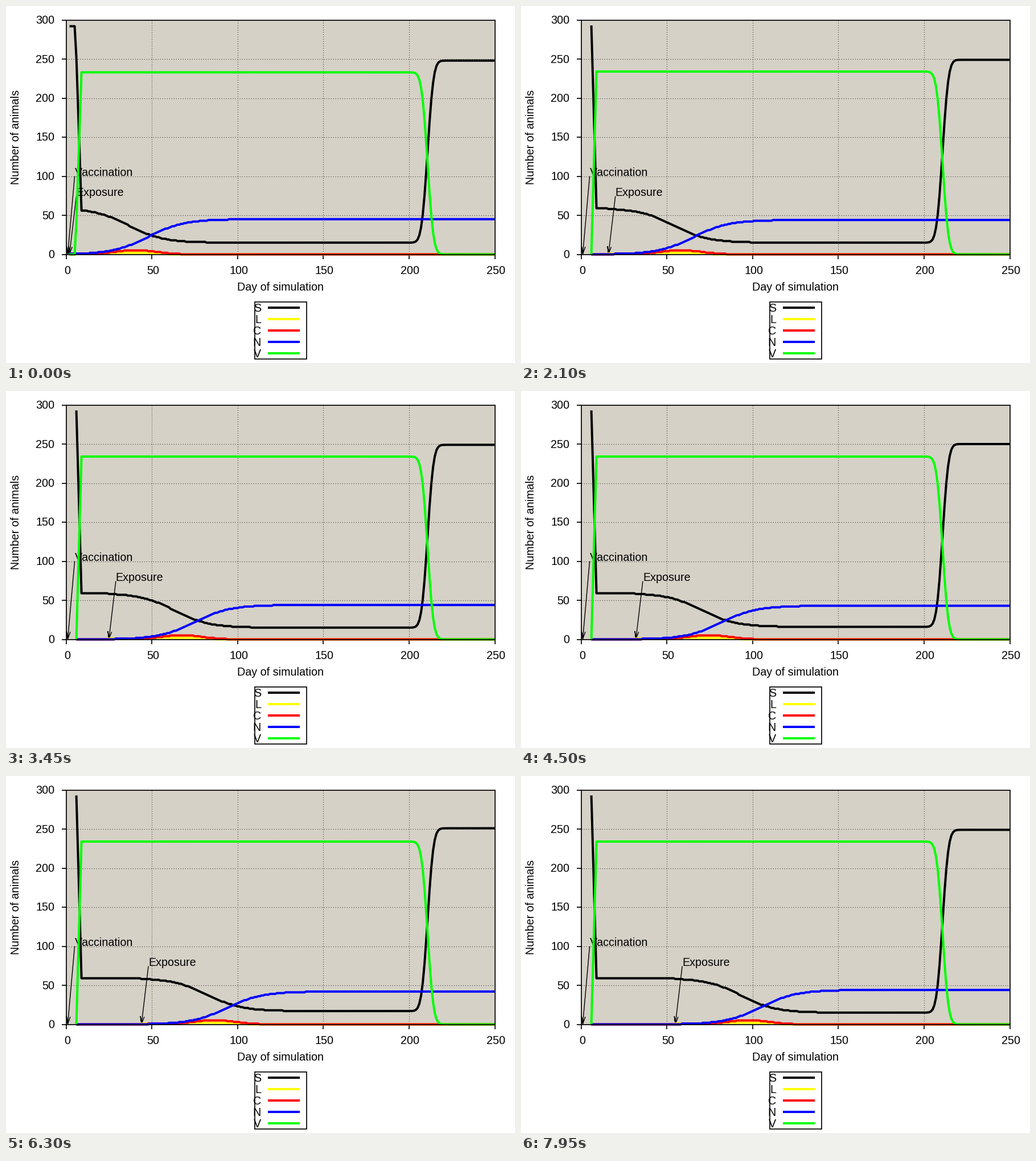
Write a matplotlib script that moves like this. It is 894 by 626 pixels and loops after 8 s.

```python
import math
import numpy as np
import matplotlib.pyplot as plt
from matplotlib.animation import FuncAnimation
from matplotlib.patches import Rectangle

W, H, DPI = 894, 626, 64
PX = 72 / DPI                      # points per pixel
LEFT, RIGHT, TOP, BOTTOM = 105.5, 858.5, 24.5, 435.5
STEP_MS, TICK_MS, LOOP_MS = 150, 50, 8000
HERD = 293
FONT = dict(family="Liberation Sans", size=19.8 * PX, color="black")
plt.rcParams["text.kerning_factor"] = 6

fig = plt.figure(figsize=(W / DPI, H / DPI), dpi=DPI, facecolor="white")
ax = fig.add_axes([0, 0, 1, 1])
ax.set(xlim=(0, W), ylim=(H, 0))
ax.axis("off")


def px_x(day):
    return LEFT + np.asarray(day) * (RIGHT - LEFT) / 250


def px_y(count):
    return BOTTOM - np.asarray(count) * (BOTTOM - TOP) / 300


def line(xs, ys, width, color="black", z=3, **kw):
    return ax.plot(xs, ys, lw=width * PX, color=color, zorder=z,
                   solid_capstyle="butt", solid_joinstyle="round", **kw)[0]


def label(x, y, text, ha="center", z=5, **kw):
    return ax.text(x, y, text, ha=ha, va=kw.pop("va", "baseline"), zorder=z, **FONT, **kw)


def box(x0, y0, x1, y1, z, face="none", edge="none"):
    ax.add_patch(Rectangle((x0, y0), x1 - x0, y1 - y0, fc=face, ec=edge,
                           lw=1.7 * PX, zorder=z))


# Plot area, grid, ticks and axis titles
box(LEFT, TOP, RIGHT, BOTTOM, 0, face="#d5d1c7")
box(LEFT, TOP, RIGHT, BOTTOM, 6, edge="black")
DOTS = dict(width=1, color="#55534f", z=1, dashes=(1.5, 2.5))
for day in range(0, 251, 50):
    x = px_x(day)
    line([x, x], [BOTTOM, BOTTOM + 8], 1.7)
    label(x + 2, 470, str(day))
    if 0 < day < 250:
        line([x, x], [TOP, BOTTOM], **DOTS)
for count in range(0, 301, 50):
    y = px_y(count)
    line([LEFT - 8, LEFT], [y, y], 1.7)
    label(85, y + 6.5, str(count), ha="right")
    if 0 < count < 300:
        line([LEFT, RIGHT], [y, y], **DOTS)
label(482, 499, "Day of simulation")
label(18, 230, "Number of animals", rotation=90, va="center")

# Legend
SERIES = dict(S="black", L="yellow", C="red", N="blue", V="lime")
box(436.5, 518.5, 527.5, 618.5, 3, face="white", edge="black")
for i, (name, color) in enumerate(SERIES.items()):
    y = 529 + 20 * i
    label(448, y + 6.5, name, ha="right")
    line([460, 516], [y, y], 4, color, z=5)

curves = {name: line([], [], 4, color, z=4 + i / 10)
          for i, (name, color) in enumerate(SERIES.items())}


class Marker:
    """Caption with an open-headed arrow to a day on the time axis."""

    def __init__(self, text, height):
        self.y = px_y(height)
        self.text = label(0, self.y, text, ha="left", z=2)
        self.arrow = line([], [], 1.4, z=2)

    def move(self, day):
        tip = complex(px_x(day), BOTTOM - 1)
        tail = complex(px_x(day + 4), self.y)
        back = 13 * (tail - tip) / abs(tail - tip)
        barbs = [tip + back * np.exp(1j * a) for a in np.radians([-15, 15])]
        path = np.array([tail, tip, barbs[0], tip, barbs[1]])
        self.arrow.set_data(path.real, path.imag)
        self.text.set_x(px_x(day + 4))


vaccination = Marker("Vaccination", 100)
exposure = Marker("Exposure", 74.5)
vaccination.move(1)

erf = np.vectorize(math.erf)


def normal_cdf(x, mean, sd):
    return (1 + erf((x - mean) / (sd * math.sqrt(2)))) / 2


def logistic(x, mid, rate):
    return 1 / (1 + np.exp(-rate * (x - mid)))


def outbreak(tau, u, onset, peak, mid, spread):
    """Case count: one animal from onset, then a bell-shaped wave."""
    wave = peak * np.exp(-((u - mid) / spread) ** 2 / 2)
    wave = np.where(u < mid, np.maximum(wave, 1), wave)
    return np.where(tau < onset, 0, np.round(wave))


def simulate(step):
    exposed = step + 2
    early = exposed < 6
    days = np.arange(min(exposed, 6), 251)
    tau = days - exposed
    u = tau - (52.3 - 3.8 * math.exp(-step / 5))   # days from the S/N crossing

    protected = HERD - 59 - early
    immune = round(np.interp(step, [0, 23, 42, 53], [45, 44, 42, 44]))
    rest = max(HERD - protected - immune, 15)

    if early:
        uptake = np.interp(days, [5, 6, 9], [0, .17, 1])
    else:
        uptake = np.interp(days, [6, 9], [0, 1])
    waned = normal_cdf(days, 210.8, 2.75)

    spared = np.where(tau < 0, 1, 1 - logistic(u, -14, .1))
    s = np.round(rest + (59 - rest) * spared) + (HERD - immune - rest) * waned
    start = HERD - early
    return days, dict(
        S=np.where(days < 9, start - (start - 59) * uptake, s),
        L=outbreak(tau, u, 0, 2.4, -16, 14),
        C=outbreak(tau, u, 4, 5.3, -10, 12),
        N=np.round(immune * logistic(u, -2.5, .097)),
        V=protected * uptake * (1 - waned))


def update(frame):
    step = frame * TICK_MS // STEP_MS
    days, counts = simulate(step)
    for name, values in counts.items():
        curves[name].set_data(px_x(days), px_y(values))
    exposure.move(step + 2)
    return [*curves.values(), exposure.text, exposure.arrow]


anim = FuncAnimation(fig, update, frames=LOOP_MS // TICK_MS, interval=TICK_MS,
                     repeat=True, repeat_delay=0, blit=False)
plt.show()
```
